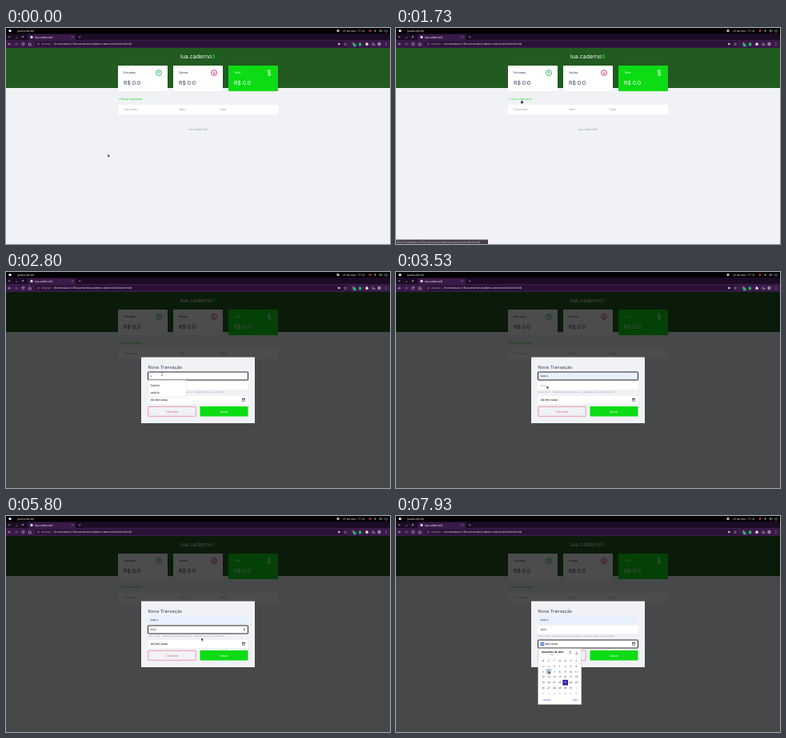
An HTML page that plays this animation: 480x270 px, repeating every 8 s.

```html
<!DOCTYPE html>
<html lang="pt-BR">
<head>
<meta charset="utf-8">
<title>Transações</title>
<style>
html, body { margin: 0; width: 100%; height: 100%; overflow: hidden; background: #f0f2f5; }
svg { display: block; width: 100vw; height: 100vh; }
text { font-family: Inter, "Open Sans", sans-serif; text-rendering: geometricPrecision; white-space: pre; }
.ui { font-family: "Noto Sans", "Open Sans", sans-serif; }
.mono { font-family: "DejaVu Sans Mono", monospace; }
</style>
</head>
<body>
<svg id="stage" viewBox="0 0 480 270"></svg>
<script>
const LOOP = 8000, TICK = 1000 / 15;
const GREEN = '#0bdc14', INK = '#363f5f', GREY = '#969cb3';
const PATH = '/home/aluno1/Documentos/caderno-exercicio/index.html#';

const rect = (x, y, w, h, fill, extra = '') =>
  `<rect x="${x}" y="${y}" width="${w}" height="${h}" fill="${fill}" ${extra}/>`;
const text = (x, y, size, str, fill, extra = '') =>
  `<text x="${x}" y="${y}" font-size="${size}" fill="${fill}" ${extra}>${str}</text>`;
const line = (d, stroke, width = .5, extra = '') =>
  `<path d="${d}" fill="none" stroke="${stroke}" stroke-width="${width}" ${extra}/>`;
const dot = (x, y, r, fill, extra = '') =>
  `<circle cx="${x}" cy="${y}" r="${r}" fill="${fill}" ${extra}/>`;
const group = (id, body) => `<g id="${id}">${body}</g>`;
const UI = 'class="ui"', MID = 'text-anchor="middle"';

function browserBars() {
  return rect(0, 0, 480, 7, '#020103') + rect(0, 7, 480, 8.5, '#1c0c25') + rect(0, 15, 480, 10, '#391a49') +
    // system bar
    dot(5, 3.5, 1.6, '#fff') + text(14, 4.8, 3.6, 'Janela Mirtel', '#ddd', UI) +
    text(421, 4.8, 3.6, '23 de dez  17:14', '#ddd', UI) +
    rect(413.5, 2, 3, 3, '#bbb', 'rx=".8"') + dot(455, 3.5, 1.5, '#b83030') + dot(461.5, 3.5, .9, '#ccc') +
    line('M466 3.5h1l1.5-1.3v2.8l-1.5-1.3M470 2.2q1 1.3 0 2.6', '#ddd') +
    line('M475 1.8v1.5M473.8 2.4a1.7 1.7 0 1 0 2.4 0', '#ddd') +
    // tab strip
    line('M3.2 10.2l2 2m0-2l-2 2M12 12.2h2M19.5 12.5l2-2m-1.6 0h1.6v1.6', '#ddd') +
    rect(27.5, 8, 59.5, 8, '#391a49', 'rx="1.5"') + dot(32, 11.4, 1.6, '#e6e3ea') +
    text(36, 12.8, 3.6, 'lua.caderno$', '#eee', UI) +
    line('M82 10.4l1.8 1.8m0-1.8l-1.8 1.8M91 11.3h2.4m-1.2-1.2v2.4', '#ccc', .4) +
    // address bar
    rect(36, 16.4, 391, 7.2, '#2a1237', 'rx="3.6"') +
    line('M6 20.2H2.8m1.4-1.4l-1.4 1.4 1.4 1.4', '#eee') + line('M11 20.2h3.2m-1.4-1.4l1.4 1.4-1.4 1.4', '#9a86a5') +
    line('M22.6 19.2a1.6 1.6 0 1 0 .2 1.4m0-2.3v1.4h-1.4', '#eee') + line('M27.8 20.2l2-1.8 2 1.8m-3.3-.3v2h2.6v-2', '#eee') +
    dot(40.3, 20.1, 1.3, 'none', 'stroke="#b9a9c2" stroke-width=".4"') +
    text(44, 21.4, 3.4, 'Arquivo', '#b9a9c2', UI) + line('M58.3 18.3v3.6', '#6e5a7a', .3) +
    text(60, 21.4, 3.5, PATH, '#e9e4ec', UI) +
    `<path d="M415.3 18.6l3.2 1.5-3.2 1.5z" fill="#ddd"/>` +
    line('M424 18.4l.6 1.2 1.2.1-.9.9.2 1.2-1.1-.6-1.1.6.2-1.2-.9-.9 1.2-.1z', '#ccc', .4) +
    dot(434.5, 19.8, 1.7, '#777') + rect(434, 20.2, 3.6, 3, '#0bc46a', 'rx=".6"') +
    rect(441, 18.4, 3, 3.8, '#15c35c', 'rx=".5"') +
    rect(449.5, 19, 2.8, 2.8, '#ddd') + dot(451, 18.8, .8, '#ddd') + dot(452.4, 20.4, .7, '#ddd') +
    line('M457.5 18.8h2m-2 1.4h2m-2 1.4h1.2', '#ddd') + dot(460.5, 21, .8, '#ddd') +
    dot(466.5, 20.1, 2, '#c9bfc8') + dot(466.5, 20.1, 1, '#5c4250') +
    [18.7, 20.1, 21.5].map(y => dot(475, y, .45, '#eee')).join('');
}

function card(x, label, fill, ink, icon) {
  return rect(x, 47, 62, 32, fill, 'rx=".8"') + text(x + 7, 57.3, 3.65, label, ink) +
    text(x + 7, 71.2, 6.9, 'R$ 0.0', ink) + icon;
}

function arrowIcon(x, color, dir) {
  return dot(x, 56, 3.5, 'none', `stroke="${color}" stroke-width=".8"`) +
    line(`M${x} ${56 + 1.8 * dir}v${-3.6 * dir}m-1.5 ${1.5 * dir}l1.5 ${-1.5 * dir} 1.5 ${1.5 * dir}`, color, .7);
}

function page() {
  return rect(0, 25, 480, 245, '#f0f2f5') + rect(0, 25, 480, 50, '#215b20') +
    text(218, 38, 7, `lua.caderno<tspan fill="${GREEN}">$</tspan>`, '#fff') +
    card(140, 'Entradas', '#fff', INK, arrowIcon(191, '#12a454', 1)) +
    card(209, 'Saídas', '#fff', INK, arrowIcon(260, '#c2185b', -1)) +
    card(278, 'Total', GREEN, '#fff',
      line('M331 54.2q-.4-1.2-2-1.2-2 0-2 1.5t2 1.5 2.1 1.6-2.1 1.5q-1.8 0-2.1-1.3M329 51.8v8.4', '#fff', .7)) +
    text(140, 90.2, 3.65, '+ Nova transação', GREEN, 'id="link"') +
    rect(140, 96, 200, 12, '#fff', 'rx=".8"') +
    [[147, 'Descrição'], [216, 'Valor'], [267, 'Data']].map(([x, s]) => text(x, 103.3, 3.65, s, GREY)).join('') +
    text(240, 128.2, 3.7, 'lua.caderno$', GREY, MID);
}

const field = (y, id) => rect(177.5, y, 125, 10, '#fff', `id="${id}" rx=".6"`);

function modal() {
  return rect(0, 25, 480, 245, '#000', 'opacity=".7"') + rect(169, 106.5, 142, 82.5, '#f0f2f5') +
    text(177.5, 120.7, 5.6, 'Nova Transação', INK) +
    field(125, 'nameBox') + text(180.5, 131, 3, '', INK, 'id="nameText"') +
    field(137, 'valueBox') + text(180.5, 143.1, 3, '', INK, 'id="valueText"') +
    group('spinner', '<path d="M296.7 141.5l1.1-1.4 1.1 1.4zM296.7 142.4l1.1 1.4 1.1-1.4z" fill="#333"/>') +
    line('M180.6 140v4', '#222', .4, 'id="caret"') +
    text(177.5, 150.7, 2.85, 'Use o sinal - (negativo) para despesas e , (vírgula) para casas decimais', GREY) +
    field(155, 'dateBox') + rect(180.6, 157.8, 4.5, 4.4, '#3d6fd6', 'id="dayMark"') +
    text(180.8, 161.3, 3.5, '<tspan id="dayText">dd</tspan>/mm/aaaa', '#111', 'class="mono"') +
    rect(295.7, 158.6, 2.8, 2.7, '#fff', 'stroke="#222" stroke-width=".5"') + rect(295.5, 158.2, 3.2, 1, '#222') +
    rect(177.8, 168.3, 59.4, 12, '#f0f2f5', 'id="cancel" rx=".6" stroke="#e85b7c" stroke-width=".6"') +
    text(207.5, 175.5, 3.7, 'Cancelar', '#e85b7c', MID) +
    rect(242.5, 168, 60, 12.6, GREEN, 'rx=".6"') + text(272.5, 175.5, 3.5, 'Salvar', '#fff', MID);
}

function suggestions() {
  return rect(177.5, 135.2, 48, 21.6, '#fff', 'stroke="#c4c4c4" stroke-width=".3"') +
    rect(177.6, 137.6, 47.8, 8.6, '#e8e8ea', 'id="pick"') +
    text(180.5, 143, 3.6, 'Salário', '#111', UI) + text(180.5, 152.2, 3.6, 'salário', '#111', UI);
}

function calendar() {
  const colX = c => 184 + c * 6.9, rowY = r => 188.6 + r * 6.9;
  const days = Array.from({ length: 42 }, (_, i) => {
    const offset = i - 2; // the 1st falls on a Wednesday
    const inMonth = offset > 0 && offset < 32;
    const day = offset < 1 ? offset + 30 : offset > 31 ? offset - 31 : offset;
    const x = colX(i % 7), y = rowY(Math.floor(i / 7)), chosen = inMonth && day === 23;
    const back = chosen ? rect(x - 3.3, y - 4.5, 6.8, 6.8, '#2f1fa8') :
      inMonth && day === 6 ? rect(x - 3.3, y - 4.5, 6.6, 6.6, '#b9cbdc', 'id="hover"') : '';
    return back + text(x, y, 3.1, day, chosen ? '#fff' : inMonth ? '#222' : '#8a8a8a', `${UI} ${MID}`);
  }).join('');
  return rect(177.6, 165.8, 54.2, 69.8, '#fff', 'stroke="#b5b5b5" stroke-width=".4"') +
    text(182, 171.3, 3.1, 'dezembro de 2021', '#111', `${UI} font-weight="700"`) +
    '<path d="M194 172.8h2l-1 1.2z" fill="#333"/>' +
    line('M217.6 173.3v-4.4m-1.7 1.7l1.7-1.7 1.7 1.7M225.6 168.9v4.4m-1.7-1.7l1.7 1.7 1.7-1.7', '#444', .45) +
    [...'DSTQQSS'].map((s, c) => text(colX(c), 181.6, 3.1, s, '#333', `${UI} ${MID}`)).join('') + days +
    text(183, 231.4, 3.2, 'Limpar', '#3b5bd0', UI) + text(220.3, 231.4, 3.2, 'Hoje', '#3b5bd0', UI);
}

function cursors() {
  const skin = 'fill="#111" stroke="#fff" stroke-width=".35"';
  return group('cursor',
    `<path id="arrow" d="M0 0v4l1-.9.7 1.5.7-.3-.7-1.5h1.3z" ${skin}/>` +
    `<path id="hand" d="M-.4 0h.8v1.8l1.7.4v1.6l-.6 1h-2l-1.2-1.6.5-.4.8.5z" ${skin}/>` +
    line('M-.8-2h1.6M0-2v4M-.8 2h1.6', '#222', .45, 'id="beam"'));
}

const stage = document.getElementById('stage');
stage.innerHTML = page() + group('modal', modal()) + group('suggestions', suggestions()) +
  group('calendar', calendar()) + browserBars() +
  group('status', rect(0, 264.6, 115, 5.4, '#2c2432', 'rx=".6"') + text(1.2, 268.5, 3.45, 'file://' + PATH, '#cfc8d3', UI)) +
  cursors();

const ui = {};
stage.querySelectorAll('[id]').forEach(node => ui[node.id] = node);
const show = (node, on) => node.setAttribute('visibility', on ? 'inherit' : 'hidden');
const clamp = v => Math.max(0, Math.min(1, v));

// [start, end, x, y]: each move starts where the previous one ended
const moves = [
  [0, 0, 127.2, 157.4], [600, 1470, 157, 89.5], [1830, 2400, 195, 127.5], [2850, 3330, 188, 142],
  [3480, 3930, 199, 140.3], [5600, 6070, 315, 171], [6070, 6400, 296.8, 160],
  [6740, 7470, 211.5, 206.5], [7480, 7930, 190.5, 193.5]
];

function cursorAt(t) {
  let [, , x, y] = moves[0];
  for (const [start, end, toX, toY] of moves.slice(1)) {
    if (t < start) break;
    const p = clamp((t - start) / (end - start)), k = p * p * (3 - 2 * p);
    x += (toX - x) * k;
    y += (toY - y) * k;
  }
  return [x, y];
}

function focus(box, on) {
  box.setAttribute('stroke', on ? '#101010' : 'none');
  box.setAttribute('stroke-width', .9);
}

function setText(node, value, placeholder) {
  node.textContent = value || placeholder;
  node.setAttribute('fill', value ? '#222' : '#8b8b8b');
}

function draw(t) {
  const within = (a, b) => t >= a - 5 && t < b - 5;
  const [x, y] = cursorAt(t);
  ui.cursor.setAttribute('transform', `translate(${x} ${y})`);
  const hand = within(1400, 1870), beam = within(2330, 2930) || within(3600, 5730);
  show(ui.hand, hand);
  show(ui.beam, beam);
  show(ui.arrow, !hand && !beam);

  ui.link.setAttribute('opacity', within(1400, 1870) ? .8 : 1);
  ui.status.setAttribute('opacity', clamp((t - 1560) / 200) * clamp((2400 - t) / 200));
  show(ui.modal, t >= 1795);

  const filled = t >= 3465;
  focus(ui.nameBox, within(2800, 4270));
  ui.nameBox.setAttribute('fill', filled ? '#e8f0fe' : '#fff');
  setText(ui.nameText, filled ? 'Salário' : t >= 2795 ? 's' : '', 'Descrição');
  show(ui.suggestions, within(2800, 3470));
  show(ui.pick, within(3200, 3470));

  const digits = [4600, 4730, 4930, 5070].filter(at => t >= at - 5).length;
  focus(ui.valueBox, within(4270, 6530));
  setText(ui.valueText, '4500'.slice(0, digits), '0,00');
  show(ui.spinner, within(4270, 6530));
  show(ui.caret, within(4270, 4600));

  const dated = t >= 6525;
  focus(ui.dateBox, dated);
  show(ui.dayMark, dated);
  ui.dayText.setAttribute('fill', dated ? '#fff' : '#111');
  show(ui.calendar, t >= 6665);
  show(ui.hover, t >= 7795);
}

function frame() {
  const t = performance.now() % LOOP;
  draw(Math.floor((t + 4) / TICK) * TICK);
  requestAnimationFrame(frame);
}
frame();
</script>
</body>
</html>
```
